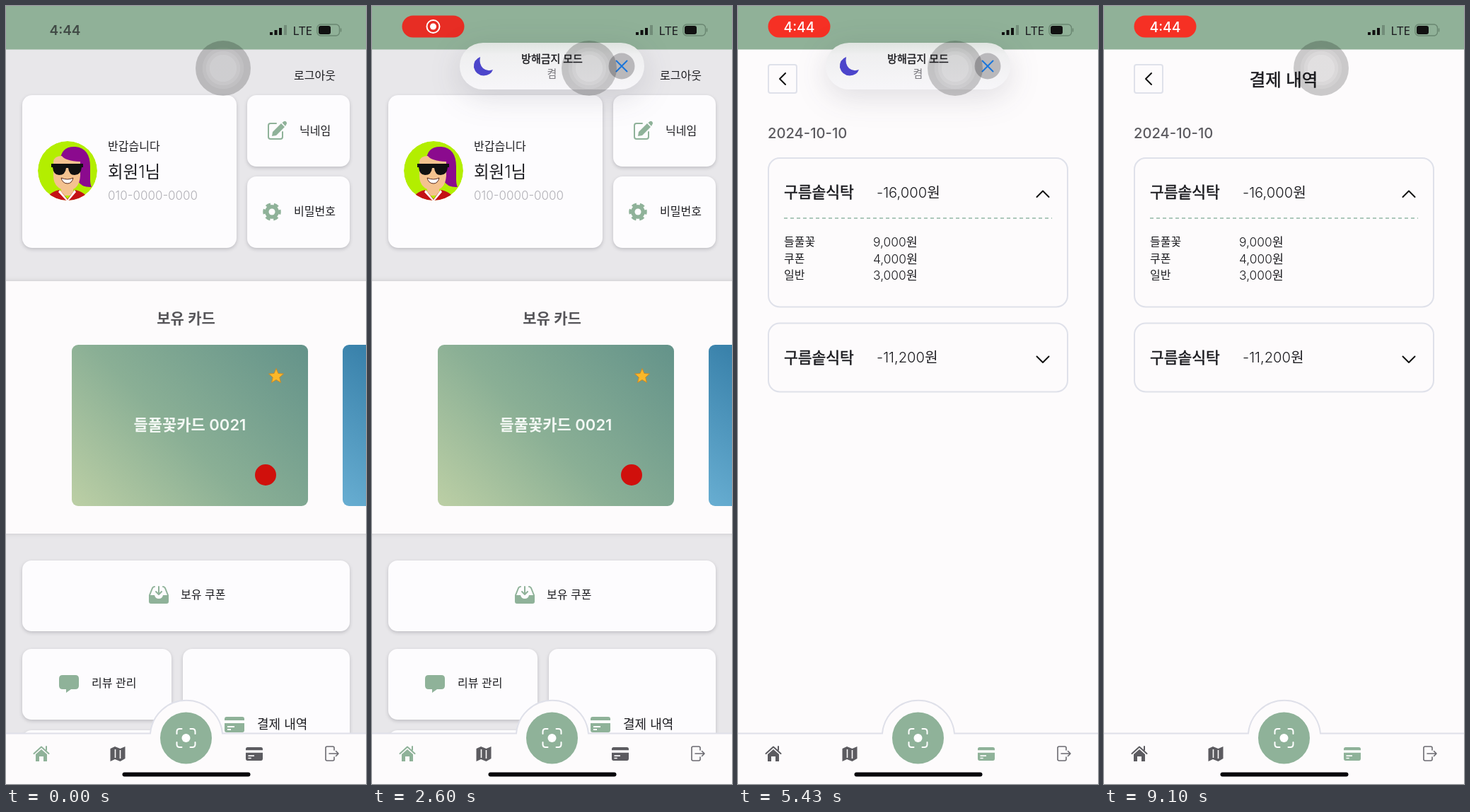
Write an HTML page that moves like this. It is 509 by 1100 pixels and loops after 9130 ms.

```html
<!DOCTYPE html>
<html lang="ko">
<head>
<meta charset="utf-8">
<title>Payment history</title>
<style>
  html, body { margin: 0; width: 100%; height: 100%; overflow: hidden; background: #fdfbfc; }
  svg { display: block; width: 100%; height: 100%; }
  text { font-family: Inter, "Noto Sans CJK KR", "Noto Sans CJK", sans-serif; font-size: 16px; font-weight: 300; fill: #1c1c20; dominant-baseline: central; }
  .mid { text-anchor: middle; }
  .green { fill: #8fb299; }
  .panel { fill: #fdfcfe; filter: drop-shadow(0 2px 2.5px rgba(60, 60, 70, .24)); }
  .line { fill: none; stroke-width: 2; stroke-linecap: round; stroke-linejoin: round; }
  .box { fill: #fdfbfc; stroke: #dfe1ea; stroke-width: 2; }
  .medium { font-weight: 500; stroke: #1c1c20; stroke-width: .55px; }
  .shop { font-size: 21.5px; }
  .sum { font-size: 20.2px; }
  .part { font-size: 17.4px; }
  .icon { color: #5c5b60; fill: currentColor; }
</style>
</head>
<body>
<svg viewBox="0 0 509 1100">
  <defs>
    <linearGradient id="cardFill" gradientUnits="userSpaceOnUse" x1="120" y1="733" x2="400" y2="453">
      <stop offset="0" stop-color="#bccfa5"/><stop offset=".45" stop-color="#8aaf95"/><stop offset="1" stop-color="#64938a"/>
    </linearGradient>
    <linearGradient id="blueFill" x1=".1" y1="1" x2=".3" y2="0">
      <stop offset="0" stop-color="#67add1"/><stop offset="1" stop-color="#3a82ab"/>
    </linearGradient>
    <linearGradient id="noticeFill" x1="0" y1="0" x2="0" y2="1">
      <stop offset="0" stop-color="#dfe4e0"/><stop offset=".25" stop-color="#efeff0"/><stop offset="1" stop-color="#f7f6f9"/>
    </linearGradient>
    <clipPath id="face"><circle cx="87" cy="233" r="42"/></clipPath>
    <clipPath id="fold"><rect id="foldBox" x="43" y="215" width="423" height="97"/></clipPath>
    <symbol id="payIcon" viewBox="0 0 28 22" overflow="visible">
      <path fill="currentColor" fill-rule="evenodd" d="M3 0H25Q28 0 28 3V5H0V3Q0 0 3 0ZM0 9H28V19Q28 22 25 22H3Q0 22 0 19ZM4 13V15H14V13ZM4 17V19H9V17Z"/>
    </symbol>
  </defs>

  <g id="home">
    <rect width="509" height="1100" fill="#e8e7ea"/>
    <text x="407" y="98">로그아웃</text>
    <rect class="panel" x="23" y="126" width="303" height="216" rx="14"/>
    <rect class="panel" x="341" y="126" width="145" height="101" rx="13"/>
    <rect class="panel" x="341" y="241" width="145" height="101" rx="13"/>

    <g clip-path="url(#face)">
      <circle cx="87" cy="233" r="42" fill="#b3ee00"/>
      <path fill="#8b0a8e" d="M77 224Q75 198 98 199Q120 201 119 230V245Q119 252 121 256Q108 257 102 248V220Z"/>
      <path fill="#f4c28f" d="M67 220Q68 212 79 212Q84 219 105 220V240Q104 255 95 259V268H78V259Q67 254 67 240Z"/>
      <path fill="#c41216" d="M56 277Q59 263 76 260L87 273L97 260Q114 263 118 277Z"/>
      <path fill="#fff" d="M76 260L87 274L97 260L99 263L87 277L74 263Z"/>
      <path fill="#111" d="M64 223H109V228H107Q106 239 97 239Q89 239 88 229H85Q84 239 75 239Q67 239 66 228H64Z"/>
      <path fill="#fff" stroke="#5b2a1c" d="M78 243Q87 247 95 243Q93 251 87 251Q80 251 78 243Z"/>
    </g>
    <text x="144" y="198">반갑습니다</text>
    <text x="144" y="234" style="font-size:23.5px">회원1님</text>
    <text x="144" y="268" style="font-size:17px;fill:#b1b0b6">010-0000-0000</text>

    <path class="line" stroke="#8fb299" d="M382 166H374Q371 166 371 169V185Q371 188 374 188H388Q391 188 391 185V178"/>
    <path class="green" d="M377 178L389 166L394 171L382 183L376 184ZM390.500 165L393 163Q395 162 396.500 164Q398 166 396 168L395 170Z"/>
    <text x="415" y="176">닉네임</text>
    <g class="green" transform="translate(376 291)">
      <circle r="10"/>
      <circle r="10" fill="none" stroke="#8fb299" stroke-width="5.500" stroke-dasharray="6.100 4.372" stroke-dashoffset="3"/>
      <circle r="4.500" fill="#fdfcfe"/>
    </g>
    <text x="407" y="290">비밀번호</text>

    <rect x="-10" y="389" width="529" height="357" fill="#fdfbfc" style="filter:drop-shadow(0 0 3px rgba(60,60,70,.2))"/>
    <text class="mid" x="254.500" y="441" style="font-size:21px;font-weight:600;fill:#565559">보유 카드</text>
    <rect x="93" y="479" width="334" height="228" rx="9" fill="url(#cardFill)"/>
    <rect x="476" y="479" width="60" height="228" rx="9" fill="url(#blueFill)"/>
    <path id="star" fill="#fbb829" stroke="#c98a28" stroke-linejoin="round"/>
    <text class="mid" x="260" y="592" style="font-size:22px;font-weight:600;fill:#f3f8f4">들풀꽃카드 0021</text>
    <circle cx="367" cy="663" r="15" fill="#d0100c"/>

    <rect class="panel" x="23" y="784" width="463" height="100" rx="13"/>
    <path class="green" d="M202 833H210Q211 838 216 838Q221 838 222 833H230V842Q230 845 227 845H205Q202 845 202 842Z"/>
    <path class="line" stroke="#8fb299" d="M203 833L207 823Q208 821 210 821M229 833L225 823Q224 821 222 821M216 821V831M212 828L216 832L220 828"/>
    <text x="247" y="832">보유 쿠폰</text>

    <rect class="panel" x="23" y="909" width="211" height="100" rx="13"/>
    <path class="green" d="M80 946H98Q103 946 103 951V961Q103 966 98 966H92L85 971V966H80Q75 966 75 961V951Q75 946 80 946Z"/>
    <text x="121" y="957">리뷰 관리</text>
    <rect class="panel" x="23" y="1024" width="211" height="100" rx="13"/>
    <rect class="panel" x="250" y="909" width="236" height="215" rx="13"/>
    <use href="#payIcon" x="309" y="1005" width="28" height="22" color="#8fb299"/>
    <text x="355" y="1015" style="font-size:18px">결제 내역</text>
  </g>

  <g id="history">
    <rect width="509" height="1100" fill="#fdfbfc"/>
    <rect class="box" x="43" y="83" width="40" height="40" rx="3"/>
    <path class="line" stroke="#111" d="M67 95L59 103L67 111"/>
    <text class="mid medium" x="254" y="104" style="font-size:24.4px">결제 내역</text>
    <text x="42" y="179" style="font-size:20.2px;font-weight:500;fill:#5c5b60">2024-10-10</text>

    <rect class="box" id="first" x="43" y="215" width="423" height="97" rx="16"/>
    <text class="shop medium" x="65" y="263">구름솥식탁</text>
    <text class="sum" x="196" y="263">-16,000원</text>
    <path class="line" id="chevron" stroke="#111" d="M-8.500 -4L0 4.500L8.500 -4"/>
    <g id="details" clip-path="url(#fold)">
      <path d="M65 300H444" stroke="#94b8a6" stroke-width="1.500" stroke-dasharray="5 4"/>
      <text x="65" y="333">들풀꽃</text><text class="part" x="191" y="333">9,000원</text>
      <text x="65" y="357">쿠폰</text><text class="part" x="191" y="357">4,000원</text>
      <text x="65" y="380">일반</text><text class="part" x="191" y="380">3,000원</text>
    </g>

    <g id="second">
      <rect class="box" x="43" y="335" width="423" height="97" rx="16"/>
      <text class="shop medium" x="65" y="383">구름솥식탁</text>
      <text class="sum" x="196" y="383">-11,200원</text>
      <path class="line" stroke="#111" d="M422.500 382L431 390.500L439.500 382"/>
    </g>
  </g>

  <g id="nav">
    <path d="M-2 1028.500H204A51.200 51.200 0 0 1 306 1028.500H511V1130H-2Z" fill="#fdfbfc" stroke="#dfe0e9" stroke-width="2"/>
    <circle class="green" cx="254.500" cy="1035" r="36.500"/>
    <g transform="translate(254.500 1035)">
      <path class="line" stroke="#fff" stroke-width="2.500" d="M-13 -6V-9Q-13 -13 -9 -13H-6M6 -13H9Q13 -13 13 -9V-6M13 6V9Q13 13 9 13H6M-6 13H-9Q-13 13 -13 9V6"/>
      <circle r="6" fill="#fff"/>
    </g>
    <g class="icon" id="homeIcon">
      <path class="line" stroke="currentColor" d="M39.500 1057L50 1047.500L60.500 1057M57 1047V1052"/>
      <path d="M42 1058L50 1051L58 1058V1068H53V1061H47V1068H42Z"/>
    </g>
    <g class="icon">
      <path d="M147.500 1050L154 1047L161.500 1050L168.500 1047V1064L161.500 1068L154 1065L147.500 1068Z"/>
      <path d="M154.500 1051V1063M161.500 1052V1064" stroke="#fdfbfc" stroke-width="1.600"/>
    </g>
    <use id="navPay" href="#payIcon" x="339" y="1048" width="24" height="19"/>
    <path class="line" stroke="#6b6a70" style="stroke-width:1.600" d="M464 1052V1049Q464 1047 462 1047H454Q452 1047 452 1049V1065Q452 1067 454 1067H462Q464 1067 464 1065V1062M457 1057H470M466.500 1053.500L470 1057L466.500 1060.500"/>
  </g>

  <rect width="509" height="61.500" fill="#90b198"/>
  <text class="mid" id="clock" x="83.500" y="34" style="font-size:19px;font-weight:600">4:44</text>
  <g id="pill">
    <rect id="pillFill" x="42.500" y="13.500" width="88" height="31" rx="15.500"/>
    <g id="record">
      <circle cx="86.500" cy="29" r="9" fill="none" stroke="#fff" stroke-width="2"/>
      <circle cx="86.500" cy="29" r="4.500" fill="#fff"/>
    </g>
    <text class="mid" id="pillClock" x="86.500" y="29.500" style="font-size:19.4px;font-weight:500;fill:#fff">4:44</text>
  </g>
  <path d="M375 37V41M381.500 34V41M388 31V41" stroke="#111" stroke-width="4"/>
  <path d="M395 27V41" stroke="#728c79" stroke-width="4"/>
  <text x="405.500" y="34.500" style="font-family:'Noto Sans',sans-serif;font-size:17px;font-weight:500">LTE</text>
  <rect x="440" y="26" width="31.500" height="16" rx="5" fill="none" stroke="#6a8671" stroke-width="1.400"/>
  <rect x="442" y="28" width="17" height="12" rx="3" fill="#111"/>
  <path d="M473.500 31.500V36.500" stroke="#6a8671" stroke-width="1.600"/>

  <g id="notice">
    <rect x="124" y="52" width="261" height="66" rx="33" fill="url(#noticeFill)" style="filter:drop-shadow(0 10px 22px rgba(50,50,70,.15))"/>
    <path fill="#4c45cb" d="M153 72Q143 76 144 87Q147 98 158 98.500Q168 98 171 90Q163 93 157 88Q151 82 153 72Z"/>
    <text class="mid medium" x="254.500" y="74" style="font-size:15px;stroke-width:.4px">방해금지 모드</text>
    <text class="mid" x="254.500" y="95" style="font-size:15px;font-weight:400;fill:#7c7b80">켬</text>
    <circle cx="353" cy="85" r="18.500" fill="#b9b8bb"/>
    <path class="line" stroke="#1b76da" d="M345.500 77.500L360.500 92.500M360.500 77.500L345.500 92.500"/>
  </g>

  <radialGradient id="touchFill">
    <stop offset=".48" stop-opacity=".11"/><stop offset=".5" stop-opacity=".14"/>
    <stop offset=".61" stop-opacity=".14"/><stop offset=".63" stop-opacity=".17"/>
    <stop offset=".74" stop-opacity=".17"/><stop offset=".76" stop-opacity=".2"/>
  </radialGradient>
  <circle cx="307" cy="88" r="39" fill="url(#touchFill)"/>
  <rect x="164.500" y="1083.500" width="181" height="6" rx="3" fill="#08070c"/>
</svg>
<script>
  const LOOP = 9130, OPEN_PAGE = 2870;
  const $ = id => document.getElementById(id);
  const set = (id, attrs) => { for (const k in attrs) $(id).setAttribute(k, attrs[k]); };
  const span = (t, start, length) => Math.min(1, Math.max(0, (t - start) / length));
  const out = (p, power = 2) => 1 - (1 - p) ** power;
  const mix = (a, b, p) => a + (b - a) * p;

  const points = Array.from({ length: 10 }, (_, i) => {
    const r = i % 2 ? 5 : 11, a = i * Math.PI / 5;
    return [382 + r * Math.sin(a), 523.5 - r * Math.cos(a)];
  });
  set('star', { d: 'M' + points.join('L') + 'Z' });

  function draw(t) {
    const onHistory = t >= OPEN_PAGE;
    set('home', { visibility: onHistory ? 'hidden' : 'visible' });
    set('history', { visibility: onHistory ? 'visible' : 'hidden' });
    set('homeIcon', { style: 'color:' + (onHistory ? '#5c5b60' : '#8fb299') });
    set('navPay', { color: onHistory ? '#8fb299' : '#5c5b60' });

    const rise = onHistory ? out(span(t, OPEN_PAGE, 300)) : 1;
    set('nav', { opacity: rise, transform: `translate(0 ${18 * (1 - rise)})` });

    const open = out(span(t, 4150, 250));
    const height = mix(97, 210.5, open);
    set('first', { height });
    set('foldBox', { height });
    set('details', { opacity: open });
    set('second', { transform: `translate(0 ${113.5 * open})` });
    set('chevron', { transform: `translate(431 266) scale(1 ${1 - 2 * open})` });

    // recording pill: fades in, pulses, then swaps its icon for the clock
    const glow = 0.5 + 0.5 * Math.cos((t - 1735) / 3680 * 2 * Math.PI);
    set('clock', { opacity: 0.68 * (1 - span(t, 70, 180)) });
    set('pill', { opacity: span(t, 150, 250) });
    set('pillFill', { fill: `rgb(${mix(212, 246, glow)} ${mix(42, 48, glow)} 36)` });
    const swap = span(t, 3600, 200);
    set('record', { opacity: 1 - swap });
    set('pillClock', { opacity: swap });

    const shown = out(span(t, 180, 450), 3) - span(t, 6680, 350) ** 2;
    set('notice', { transform: `translate(0 ${-180 * (1 - shown)})` });
  }

  const start = performance.now();
  function tick() {
    draw((performance.now() - start) % LOOP);
    requestAnimationFrame(tick);
  }
  tick();
</script>
</body>
</html>
```
